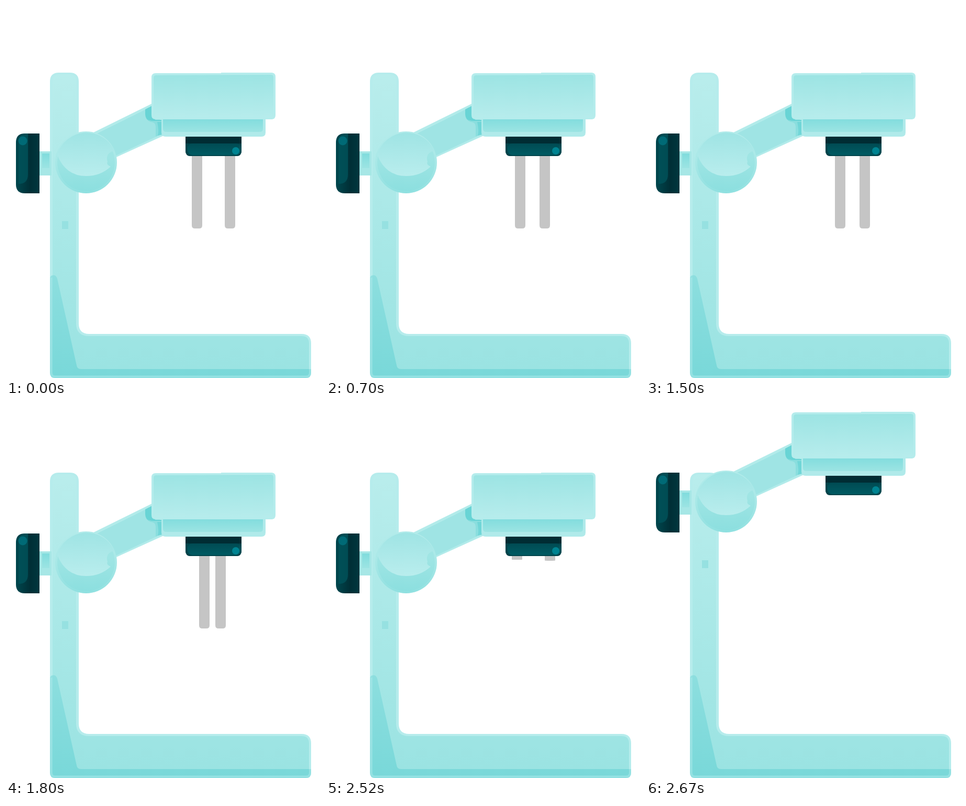
Recreate the animation shown at these times as an HTML page. Size 600 px wide and 709 px high, loop 2.7 s.

```html
<!DOCTYPE html>
<html lang="en">
<head>
<meta charset="utf-8">
<title>Bench mixer</title>
<style>
  html, body { margin: 0; width: 100%; height: 100%; overflow: hidden; background: #fff; }
  svg { display: block; width: 100vw; height: 100vh; }
</style>
</head>
<body>
<svg viewBox="0 0 600 709">
  <defs>
    <linearGradient id="column" gradientUnits="userSpaceOnUse" x1="0" y1="127" x2="0" y2="700">
      <stop stop-color="#b9edec"/><stop offset="1" stop-color="#9ae3e2"/>
    </linearGradient>
    <linearGradient id="wedge" x2="0" y2="1">
      <stop stop-color="#80dadb"/><stop offset="1" stop-color="#67d2d4"/>
    </linearGradient>
    <linearGradient id="box" x2="0" y2="1">
      <stop stop-color="#9ce4e3"/><stop offset="1" stop-color="#b6ecec"/>
    </linearGradient>
    <linearGradient id="plate" x2="0" y2="1">
      <stop stop-color="#80dcdd"/><stop offset="1" stop-color="#9ce4e3"/>
    </linearGradient>
    <linearGradient id="lens" x2="0" y2="1">
      <stop stop-color="#9fe4e4"/><stop offset="1" stop-color="#b9eded"/>
    </linearGradient>
    <linearGradient id="ball" x2="0" y2="1">
      <stop stop-color="#b2ebea"/><stop offset=".5" stop-color="#a8e8e7"/><stop offset="1" stop-color="#8fe0e0"/>
    </linearGradient>
    <linearGradient id="bowl" x2="0" y2="1">
      <stop offset=".4" stop-color="#a0e5e4"/><stop offset="1" stop-color="#8cdfdf"/>
    </linearGradient>
    <linearGradient id="knob">
      <stop stop-color="#00474e"/><stop offset=".6" stop-color="#002f36"/><stop offset="1" stop-color="#00373e"/>
    </linearGradient>
    <linearGradient id="clamp" x2="0" y2="1">
      <stop stop-color="#004b53"/><stop offset="1" stop-color="#005a62"/>
    </linearGradient>
  </defs>

  <!-- stand -->
  <path fill="#b6ecec" d="M84 144Q84 127 101 127H122Q139 127 139 144V605Q139 625 159 625H565Q583 625 583 643V699Q583 709 573 709H94Q84 709 84 699Z"/>
  <path fill="url(#column)" d="M89 144Q89 131 101 131H122Q134 131 134 144V605Q134 629 159 629H565Q579 629 579 643V699Q579 704 574 704H94Q89 704 89 699Z"/>
  <path fill="url(#wedge)" opacity=".65" d="M84 520Q84 513 91 513Q96 513 98 520L135 685Q136 692 143 692H583V699Q583 709 573 709H94Q84 709 84 699Z"/>
  <path fill="none" stroke="#b6ecec" stroke-width="4" opacity=".35" d="M86.500 518V699Q86.500 706.500 94 706.500H573Q581 706.500 581 699V692"/>

  <g id="head">
    <path fill="#96e1e1" d="M107 410h12v15h-12z"/>

    <!-- knob and stem -->
    <path fill="#a6e7e6" d="M64 277h23v46h-23z"/>
    <path fill="url(#plate)" d="M69 281h14v28h-14z"/>
    <path fill="url(#knob)" d="M64 243H36Q19 243 19 260V340Q19 357 36 357H64Z"/>
    <path fill="#00535b" opacity=".8" d="M42 243H36Q24 245 24 260V339Q42 339 42 321Z"/>
    <circle cx="32" cy="257" r="8.500" fill="#006a76"/>

    <!-- arm -->
    <path fill="#b2ebea" d="M155 247L285 183L308 244L200 293Z"/>
    <path fill="#9fe4e4" d="M160 250L285 188L302 242L204 288Z"/>
    <path fill="#68d4d5" d="M266 197L285 187V217H300V221H280Q266 219 266 205Z"/>
    <path fill="#8adede" d="M270 215Q274 219 281 219H300V243L286 249V230Q286 221 276 221Z"/>
    <path fill="#70d6d7" d="M289 221h10v24l-9 2q3-8-1-26z"/>

    <!-- joint -->
    <circle cx="153" cy="298" r="59" fill="url(#ball)"/>
    <circle cx="153" cy="298" r="55" fill="url(#bowl)"/>
    <path fill="url(#lens)" d="M98 284Q114 324 153 324Q181 324 200 306Q191 302 194 297Q189 280 207 276A58 58 0 0 0 98 284Z"/>

    <!-- housing -->
    <path fill="#b0eaea" d="M297 211H496V241Q496 249 488 249H305Q297 249 297 241Z"/>
    <path fill="url(#plate)" d="M300 213H491V234Q491 240 485 240H306Q300 240 300 234Z"/>
    <path fill="#b5ecec" d="M278 136Q278 128 286 128H411V127H507Q515 127 515 135V208Q515 216 507 216H286Q278 216 278 208Z"/>
    <path fill="url(#box)" d="M282 137Q282 132 287 132L506 131Q511 131 511 136V207Q511 212 506 212H287Q282 212 282 207Z"/>
  </g>

  <g fill="#c5c5c5"><path id="left"/><path id="right"/></g>

  <g id="chuck">
    <path fill="#002c33" d="M343 249H450V276Q450 286 440 286H353Q343 286 343 276Z"/>
    <path fill="#00444b" d="M343 262H450V276Q450 286 440 286H353Q343 286 343 276Z"/>
    <rect x="347" y="262" width="102" height="22" rx="9" fill="url(#clamp)"/>
    <circle cx="439" cy="276" r="7" fill="#008391"/>
  </g>
</svg>
<script>
const $ = id => document.getElementById(id);
const LOOP = 2700, SWING = 2400, TOP = 280;
const leftX = [355, 361, 369, 377, 385];
const rightX = [418, 408, 400, 391, 383];

function drawRod(rod, x, bottom) {
  const h = bottom - TOP;
  const ry = Math.min(6, h / 23);
  rod.setAttribute('d', h > 0
    ? `M${x} ${TOP}h20v${h - ry}q0 ${ry} -6 ${ry}h-8q-6 0 -6 ${-ry}z`
    : '');
}

function draw(now) {
  const t = now % LOOP;
  let squeeze = 0, lift = 0, leftEnd = 424, rightEnd = 424;
  if (t < SWING) {
    // open, close and open again every eight steps
    const step = Math.floor(t / 100) % 8;
    squeeze = Math.min(step, 8 - step);
  } else {
    // rods retract, then the head rises
    const step = Math.floor((t - SWING) / 30);
    leftEnd = 424 - 32.75 * step;
    rightEnd = 428 - 33.25 * step;
    lift = Math.max(0, step - 4) * 23.2;
  }
  drawRod($('left'), leftX[squeeze], leftEnd);
  drawRod($('right'), rightX[squeeze], rightEnd);
  for (const id of ['head', 'chuck']) $(id).setAttribute('transform', `translate(0 ${-lift})`);
  requestAnimationFrame(() => draw(performance.now() - start));
}

const start = performance.now();
draw(0);
</script>
</body>
</html>
```
